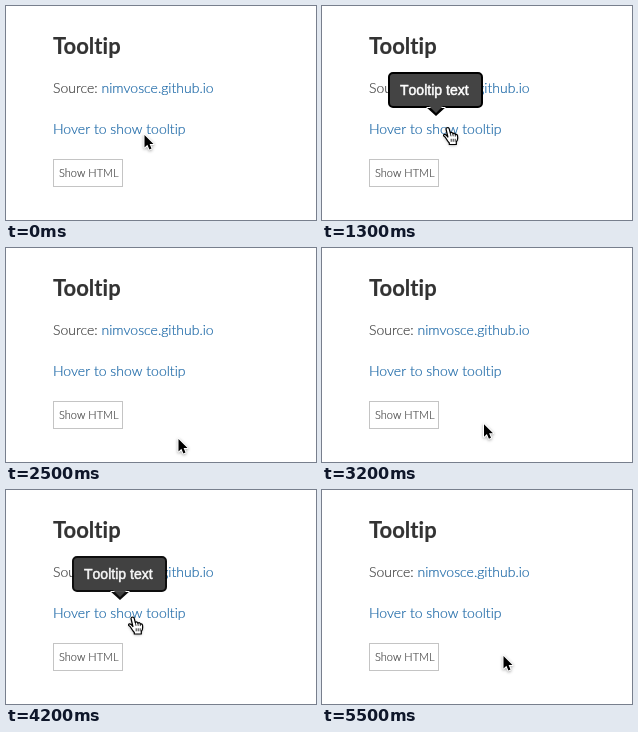
Recreate the animation shown at these times as an HTML page with a canvas. Size 310 by 214 pixels, loop 6000 ms.

```html
<!DOCTYPE html>
<html lang="en">
<head>
<meta charset="utf-8">
<title>Tooltip</title>
<style>
html, body { margin: 0; width: 100%; height: 100%; overflow: hidden; background: #fff; }
canvas { display: block; width: 310px; height: 214px; }
</style>
</head>
<body>
<canvas id="stage"></canvas>
<script>
const W = 310, H = 214, LOOP = 6000, STEP = 100;
const canvas = document.getElementById('stage');
const ctx = canvas.getContext('2d');
const dpr = window.devicePixelRatio || 1;
canvas.width = W * dpr;
canvas.height = H * dpr;

const LATO = 'Lato, sans-serif';
const ARIAL = '"Liberation Sans", Arial, sans-serif';

const arrowShape = new Path2D('M0 0V12.6L2.9 9.8L4.9 14.4L7 13.5L5.1 9H9Z');
const handShape = new Path2D(
  'M5 10.5L3 2Q3.2 .5 4.6 .5Q5.9 .6 6.3 2.2L7.3 6.2Q7.8 5.2 9 5.5Q9.8 5.9 9.9 6.8' +
  'Q11 5.7 12 6.6L12.3 7.6Q13.8 6.9 14.5 8.4Q15 11 14.4 13L13.3 15V17.5H6.3V16' +
  'Q4.6 14.2 3.4 12Q2.2 10 .8 9.1Q.1 8 1.3 7.4Q2.6 7.1 4.6 9.6');
const handLines = new Path2D('M7.3 6.2L8 9.3M9.9 6.8L10.2 9.3M12.3 7.6V9.6M8.2 11.8V14.8M10.2 11.8V14.8M12.2 11.8V14.8');

// time, x, y of the pointer's hot spot
const track = [
  [0, 138, 128], [300, 129, 122], [1000, 129, 122], [1300, 126, 121], [1900, 124, 121],
  [2000, 124, 121], [2300, 158, 172], [2500, 172, 190], [2600, 172, 191],
  [2900, 172, 191], [3300, 158, 170], [3700, 129, 130], [3800, 127, 128.5],
  [4200, 127, 126.5], [5000, 127, 126.5], [5200, 155, 148], [5400, 186, 166], [5500, 181, 165], [6000, 181, 165]
];
const hoverTimes = [[100, 2100], [3700, 5100]];
const tipTimes = [[600, 2100], [3900, 5100]];
const FADE = 350;

const clamp = v => Math.max(0, Math.min(1, v));
const ease = v => v * v * (3 - 2 * v);

function pointerAt(t) {
  let i = 1;
  while (i < track.length - 1 && t > track[i][0]) i++;
  const [t0, x0, y0] = track[i - 1], [t1, x1, y1] = track[i];
  const k = clamp((t - t0) / (t1 - t0));
  return [x0 + (x1 - x0) * k, y0 + (y1 - y0) * k];
}

function tipAlpha(t) {
  return Math.max(...tipTimes.map(([on, off]) =>
    ease(clamp((t - on) / FADE)) * (1 - ease(clamp((t - off) / FADE)))));
}

// a thin outline gives the text its slightly heavier smoothing
function text(str, x, y, font, color, outline) {
  ctx.font = font;
  ctx.letterSpacing = '0.01px'; // turns ligatures off
  ctx.fillStyle = ctx.strokeStyle = color;
  ctx.lineWidth = outline;
  ctx.fillText(str, x, y);
  ctx.strokeText(str, x, y);
  return x + ctx.measureText(str).width;
}

function drawPage() {
  const body = '300 14px ' + LATO, link = '#1f6aa8';
  text('Tooltip', 47, 48, '700 22px ' + LATO, '#333', 0.15);
  const x = text('Source: ', 47, 87, body, '#444', 0.2);
  text('nimvosce.github.io', x, 87, body, link, 0.2);
  text('Hover to show tooltip', 47, 128, body, link, 0.2);
  text('Show HTML', 53, 171, '300 11px ' + LATO, '#444', 0.15);
  ctx.strokeStyle = '#c4c4c4';
  ctx.lineWidth = 1;
  ctx.strokeRect(47.5, 153.5, 69, 27);
}

function drawTip(alpha) {
  if (!alpha) return;
  ctx.save();
  ctx.globalAlpha = alpha;
  ctx.fillStyle = '#000';
  ctx.beginPath();
  ctx.roundRect(66, 66, 95, 36, 5);
  ctx.moveTo(104, 101);
  ctx.lineTo(114, 110);
  ctx.lineTo(124, 101);
  ctx.fill();
  ctx.fillStyle = '#444';
  ctx.beginPath();
  ctx.roundRect(68, 68, 91, 32, 3);
  ctx.moveTo(107, 100);
  ctx.lineTo(114, 107);
  ctx.lineTo(121, 100);
  ctx.fill();
  ctx.fontKerning = 'none';
  text('Tooltip text', 78, 89, '14px ' + ARIAL, '#fff', 0.5);
  ctx.restore();
}

function shadow(on) {
  ctx.shadowColor = on ? 'rgba(0,0,0,.35)' : 'transparent';
  ctx.shadowBlur = on ? 3 * dpr : 0;
  ctx.shadowOffsetY = on ? dpr : 0;
}

function drawPointer(t) {
  const [x, y] = pointerAt(t);
  const hand = hoverTimes.some(([on, off]) => t >= on && t < off);
  ctx.save();
  ctx.lineJoin = 'round';
  ctx.translate(hand ? x - 5 : x + 0.5, hand ? y : y + 1);
  shadow(true);
  if (hand) {
    ctx.fillStyle = '#fff';
    ctx.fill(handShape);
    shadow(false);
    ctx.strokeStyle = '#000';
    ctx.lineWidth = 1.2;
    ctx.stroke(handShape);
    ctx.lineWidth = 0.8;
    ctx.stroke(handLines);
  } else {
    ctx.strokeStyle = '#fff';
    ctx.lineWidth = 2;
    ctx.stroke(arrowShape);
    shadow(false);
    ctx.fillStyle = '#000';
    ctx.fill(arrowShape);
  }
  ctx.restore();
}

function draw(now) {
  const t = Math.floor((now % LOOP) / STEP) * STEP;
  ctx.setTransform(dpr, 0, 0, dpr, 0, 0);
  ctx.fillStyle = '#fff';
  ctx.fillRect(0, 0, W, H);
  drawPage();
  drawTip(tipAlpha(t));
  drawPointer(t);
}

const start = performance.now();
function tick() {
  draw(performance.now() - start);
  requestAnimationFrame(tick);
}
tick();
</script>
</body>
</html>
```
